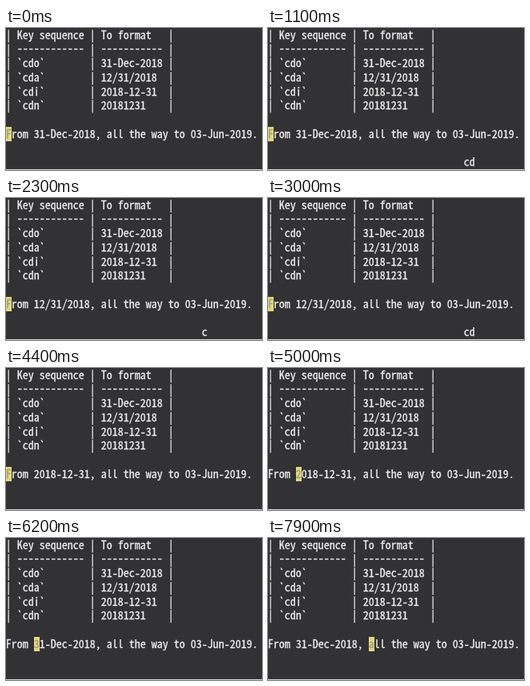
Write an HTML page that moves like this. It is 320x178 px and loops after 8 s.

```html
<!DOCTYPE html>
<html lang="en">
<head>
<meta charset="utf-8">
<title>Date format keys</title>
<style>
  html, body { margin: 0; width: 100%; height: 100%; overflow: hidden; background: #323234; }
  #screen {
    position: relative; width: 320px; height: 178px; overflow: hidden;
    color: #ececec; -webkit-text-stroke: .3px;
    font: 14px/17.65px "Noto Sans Mono CJK JP", "Noto Sans Mono CJK SC", "Noto Sans Mono", monospace;
    font-feature-settings: "zero"; font-variant-ligatures: none;
  }
  pre { position: absolute; left: -.3px; top: 0; margin: 0; font: inherit; font-feature-settings: inherit; }
  i { position: relative; top: -2px; font-style: normal; }
  b { font-weight: inherit; color: #a39d78; }
  #sentence { top: 123.5px; }
  #keys { left: 244.7px; top: 158.9px; }
  #cursor { position: absolute; top: 123.5px; width: 7px; height: 18px; background: #e2d97a; }
  #edge { position: absolute; top: 177px; width: 320px; height: 1px; background: #d6d6d6; }
</style>
</head>
<body>
<div id="screen">
<pre>| Key sequence | To format   |
| <i>------------</i> | <i>-----------</i> |
| `cdo`        | 31-Dec-2018 |
| `cda`        | 12/31/2018  |
| `cdi`        | 2018-12-31  |
| `cdn`        | 20181231    |</pre>
<div id="cursor"></div>
<pre id="sentence"><span id="before"></span><b id="under"></b><span id="after"></span></pre>
<pre id="keys"></pre>
<div id="edge"></div>
</div>
<script>
const LOOP = 8000, CELL = 7;
const $ = id => document.getElementById(id);

// Each track lists [start time, value]; a value holds until the next start.
const dates = [[0, '31-Dec-2018'], [1400, '12/31/2018'], [3100, '2018-12-31'], [6000, '31-Dec-2018']];
const pending = [
  [0, ''], [800, 'c'], [1100, 'cd'], [1400, ''],
  [2300, 'c'], [2700, 'cd'], [3100, ''],
  [5200, 'c'], [5500, 'cd'], [6000, '']
];
const columns = [[0, 0], [4500, 5], [7700, 18]];

const valueAt = (track, time) => track.findLast(([start]) => start <= time)[1];

function setText(id, text) {
  if ($(id).textContent !== text) $(id).textContent = text;
}

function draw() {
  const time = performance.now() % LOOP;
  const sentence = `From ${valueAt(dates, time)}, all the way to 03-Jun-2019.`;
  const column = valueAt(columns, time);
  setText('before', sentence.slice(0, column));
  setText('under', sentence[column]);
  setText('after', sentence.slice(column + 1));
  setText('keys', valueAt(pending, time));
  $('cursor').style.left = column * CELL + 'px';
  requestAnimationFrame(draw);
}
draw();
</script>
</body>
</html>
```
